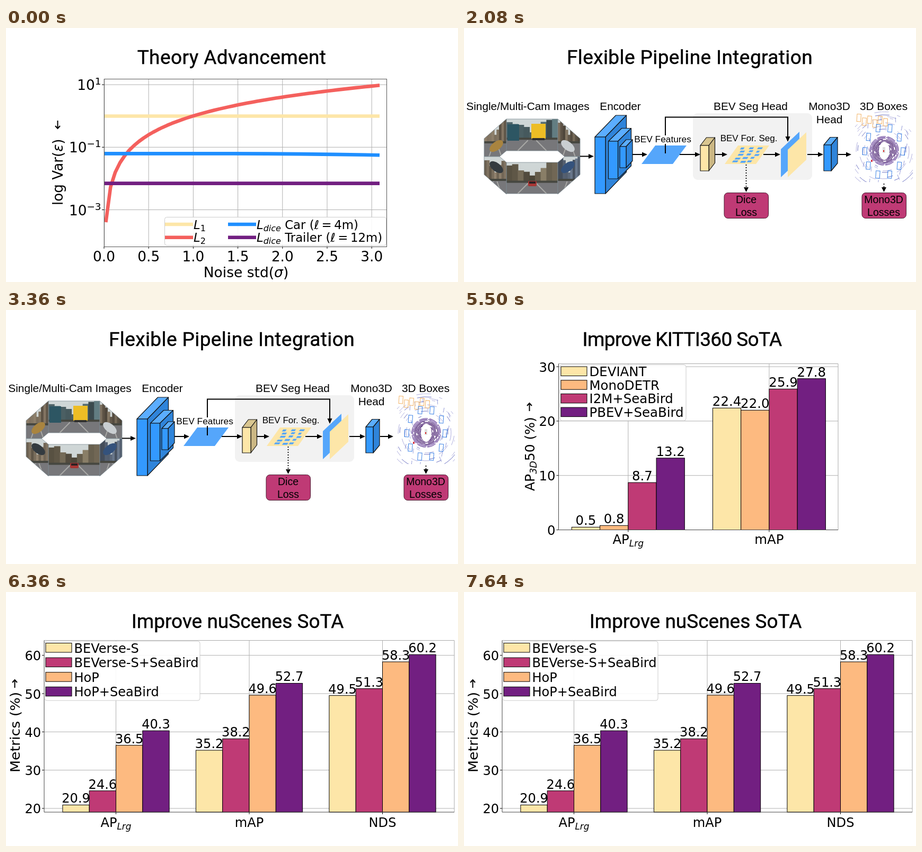
An HTML page that plays this animation: 853x480 px, repeating every 8500 ms.

```html
<!DOCTYPE html>
<html lang="en">
<head>
<meta charset="utf-8">
<title>Results slides</title>
<style>
html, body { margin: 0; width: 100%; height: 100%; overflow: hidden; background: #fff; }
svg { display: block; width: 100%; height: 100%; }
.title { font: 37px Roboto, "Open Sans", sans-serif; text-anchor: middle; stroke: #000; stroke-width: .45px; }
.plot { font-family: "DejaVu Sans", sans-serif; }
.flow { font-family: "Liberation Sans", Arial, sans-serif; text-anchor: middle; }
.mid { text-anchor: middle; }
.end { text-anchor: end; }
.it { font-style: italic; }
</style>
</head>
<body>
<svg id="stage" viewBox="0 0 853 480"></svg>
<script>
const YELLOW = '#fde6a8', ORANGE = '#fdba80', PINK = '#bf3a75', PURPLE = '#721f81';
const RED = '#f4605d', BLUE = '#1f8fff', SKY = '#55a6fb', GRID = '#b0b0b0';

// drawing helpers
const line = (x1, y1, x2, y2, c = '#000', w = 1, o = '') =>
  `<line x1="${x1}" y1="${y1}" x2="${x2}" y2="${y2}" stroke="${c}" stroke-width="${w}" ${o}/>`;
const rect = (x, y, w, h, c, o = '') =>
  `<rect x="${x}" y="${y}" width="${w}" height="${h}" fill="${c}" ${o}/>`;
const poly = (pts, c, o = '') => `<polygon points="${pts}" fill="${c}" ${o}/>`;
const path = (d, c, w, o = '') => `<path d="${d}" fill="none" stroke="${c}" stroke-width="${w}" ${o}/>`;
const text = (x, y, s, size, cls = '', k = 1) =>
  `<text class="${cls}" font-size="${size}" transform="translate(${x} ${y}) scale(${k} 1)">${s}</text>`;
const upText = (x, y, s, size, k = 1) =>
  `<text font-size="${size}" transform="translate(${x} ${y}) rotate(-90) scale(1 ${k})">${s}</text>`;
const shift = (s, size, dy, it = true) =>
  `<tspan font-size="${size}" dy="${dy}"${it ? ' class="it"' : ''}>${s}</tspan>`;
const italic = s => `<tspan class="it">${s}</tspan>`;
const title = (x, s, gap) => `<text class="title" x="${x}" y="68" letter-spacing="${gap}">${s}</text>`;
const pointer = (x, y, d) => path(`M${x} ${y}v${15 * d}m-4.5 ${-5 * d}l4.5 ${5 * d}l4.5 ${-5 * d}`, '#000', 2);
const legendBox = (x, y, w, h) => rect(x, y, w, h, '#fff', 'fill-opacity=".9" stroke="#ccc" rx="4"');
const each = (n, fn) => Array.from({ length: n }, (_, i) => fn(i)).join('');
const random = seed => () => (seed = (seed * 16807) % 2147483647) / 2147483647;

function theory() {
  const X = s => 185 + 168.4 * s, Y = e => 166.2 - 59.1 * e;
  let out = title(426, 'Theory Advancement', .4);
  out += each(7, i => {
    const x = X(i / 2);
    return line(x, 96, x, 413, GRID) + line(x, 413, x, 417) + text(x, 441, (i / 2).toFixed(1), 26.3, 'mid');
  });
  for (const e of [1, -1, -3]) {
    const y = Y(e), power = String(e).replace('-', '−');
    out += line(185, y, 718, y, GRID) + line(181, y, 185, y) +
      text(179.5, y + 10, '10' + shift(power, 18.4, -10, false), 26.3, 'end');
  }
  const curve = each(59, i => {
    const s = .02 + i * .0529;
    return (i ? 'L' : 'M') + X(s).toFixed(1) + ' ' + Y(2 * Math.log10(s)).toFixed(1);
  });
  out += line(185, 166.5, 705, 166.5, YELLOW, 6.6) + path(curve, RED, 6.6, 'stroke-linejoin="round"');
  out += path('M185 237.4H430Q570 237.6 705 240.2', BLUE, 6.6) + line(185, 293.6, 705, 293.6, PURPLE, 6.6);
  out += rect(185.5, 96.5, 533, 317, 'none', 'stroke="#555"') + legendBox(299.5, 357.5, 418, 53.5);

  const name = (sub, it, rest = '') =>
    italic('L') + shift(sub, 16, 4, it) + (rest && shift(' ' + rest, 22.8, -4, false));
  const keys = [
    [YELLOW, name('1', false)], [RED, name('2', false)],
    [BLUE, name('dice', true, 'Car (ℓ\u2009=\u20094m)')], [PURPLE, name('dice', true, 'Trailer (ℓ\u2009=\u200912m)')]
  ];
  keys.forEach(([c, s], i) => {
    const x = i < 2 ? 300 : 419, y = 371 + 24.7 * (i % 2);
    out += line(x, y, x + 53, y, c, 6.6) + text(x + 54, y + 8.5, s, 22.8);
  });
  out += text(453, 471, `Noise std(${italic('σ')})`, 26.5, 'mid') + upText(107, 335, `log Var(${italic('ε')})`, 26.2);
  return out + pointer(97.5, 175, 1);
}

function barChart(c) {
  const { L, R, T, B, k, size } = c;
  const Y = v => c.zero - v * c.unit;
  let out = '', labels = '';
  for (let v = c.first; Y(v) > T; v += 10) {
    out += line(L, Y(v), R, Y(v), GRID) + line(L - 4, Y(v), L, Y(v)) + text(L - 6, Y(v) + 9.5, v, size, 'end', k);
  }
  c.groups.forEach(([name, vals], g) => {
    const x = c.x0 + g * c.gap;
    out += line(x, T, x, B, GRID) + line(x, B, x, B + 4) + text(x, c.nameY, name, size, 'mid', k);
    vals.forEach((v, i) => {
      const left = x + (i - 2) * c.w, top = Y(v);
      out += rect(left, top, c.w, B - top, c.colors[i], 'stroke="#000"');
      labels += text(left + c.w / 2, top - 4, v.toFixed(1), size, 'mid', k);
    });
  });
  out += path(`M${L} ${T}H${R}V${B}`, '#aaa', 1) + path(`M${L} ${T}V${B}H${R}`, '#444', 1) + labels;
  const [x, y, w, h, step] = c.legend;
  out += legendBox(x, y, w, h);
  c.names.forEach((s, i) => {
    const cy = y + 12.5 + i * step;
    out += rect(x + 2, cy - 9, 49, 17.5, c.colors[i], 'stroke="#000"') + text(x + 55.5, cy + 9, s, size, '', k);
  });
  return out;
}

const apLrg = size => 'AP' + shift('Lrg', size * .7, 5);

function kitti() {
  return title(411.5, 'Improve KITTI360 SoTA', -.65) + barChart({
    L: 178.5, R: 706, T: 101.5, B: 415.5, k: 1, size: 24.4,
    zero: 415.5, unit: 10.28, first: 0, x0: 309.8, gap: 266.1, w: 53.25, nameY: 441.5,
    colors: [YELLOW, ORANGE, PINK, PURPLE],
    names: ['DEVIANT', 'MonoDETR', 'I2M+SeaBird', 'PBEV+SeaBird'],
    legend: [181, 103.5, 238, 105.5, 25.7],
    groups: [[apLrg(24.4), [.5, .8, 8.7, 13.2]], ['mAP', [22.4, 22, 25.9, 27.8]]]
  }) + upText(132.5, 342, 'AP' + shift('3D', 17.5, 4.5) + shift('50 (%)', 25, -4.5, false), 25) + pointer(123.5, 191, -1);
}

function nuscenes() {
  return title(437, 'Improve nuScenes SoTA', 0) + barChart({
    L: 72, R: 846, T: 91.5, B: 416, k: .94, size: 25.6,
    zero: 553.6, unit: 7.232, first: 20, x0: 207.5, gap: 251.5, w: 50.3, nameY: 443.5,
    colors: [YELLOW, PINK, ORANGE, PURPLE],
    names: ['BEVerse-S', 'BEVerse-S+SeaBird', 'HoP', 'HoP+SeaBird'],
    legend: [73, 93, 293, 112, 27.6],
    groups: [
      [apLrg(25.6), [20.9, 24.6, 36.5, 40.3]],
      ['mAP', [35.2, 38.2, 49.6, 52.7]],
      ['NDS', [49.5, 51.3, 58.3, 60.2]]
    ]
  }) + upText(25.5, 341, 'Metrics (%)', 26.8, .9) + pointer(16.5, 181, -1);
}

// box with front face (x, y, w, h) and depth (dx, dy)
function cube(x, y, w, h, dx, dy, [front, top, side]) {
  const o = 'stroke="#111" stroke-width="1.2" stroke-linejoin="round"', r = x + w;
  return poly([x, y, x + dx, y - dy, r + dx, y - dy, r, y], top, o) +
    poly([r, y, r + dx, y - dy, r + dx, y - dy + h, r, y + h], side, o) + rect(x, y, w, h, front, o);
}

const slab = (x, y, w, h, lean, c) => poly([x, y + h, x + lean, y, x + lean + w, y, x + w, y + h], c);
const panel = (x, y, w, h, rise, c) => poly([x, y, x + w, y - rise, x + w, y - rise + h, x, y + h], c);
const arrow = (x1, x2, y) => line(x1, y, x2 - 8, y, '#000', 2) + poly([x2 - 10, y - 4.5, x2, y, x2 - 10, y + 4.5], '#000');
const drop = (x, y1, y2) => line(x, y1, x, y2 - 8, '#000', 1.8, 'stroke-dasharray="2 3"') +
  poly([x - 4.5, y2 - 9, x + 4.5, y2 - 9, x, y2], '#000');

// street view clipped to a polygon: sky, seeded buildings, road with lanes
function street(pts, id, x, y, w, h, hue) {
  const rnd = random(id * 97 + 5), horizon = y + h * .62, n = 9, bw = w / n;
  let body = rect(x, y, w, h, '#cfd6d6');
  body += each(n, i => {
    const tall = h * (.2 + .16 * Math.abs(i - 4) * (.5 + rnd() * .7)), shade = 26 + rnd() * 24;
    return rect(x + i * bw, horizon - tall, bw + 1, tall + 2, `hsl(${hue} 14% ${shade}%)`);
  });
  body += rect(x, horizon, w, h, '#77777a') + rect(x, horizon - 2, w, 4, '#464740');
  body += each(2, i => path(`M${x + w * (.42 + .16 * i)} ${horizon + 3}L${x + w * (.22 + .56 * i)} ${y + h}`, '#a9a9a6', 2));
  return `<clipPath id="cam${id}">${poly(pts, '#000')}</clipPath><g clip-path="url(#cam${id})">${body}</g>` +
    poly(pts, 'none', 'stroke="#7c8b93" stroke-width=".8"');
}

function cameras() {
  let out = street([80, 172, 177, 172, 177, 232, 80, 232], 1, 80, 172, 97, 60, 190) +
    street([80, 254, 177, 254, 177, 313, 80, 313], 2, 80, 254, 97, 59, 40);
  for (let i = 0; i < 4; i++) {
    const fx = x => i % 2 ? 257 - x : x, fy = y => i > 1 ? 486 - y : y;
    const pts = [[80, 172], [38, 209], [38, 243], [67, 243], [80, 232]].map(([x, y]) => [fx(x), fy(y)]);
    const x = i % 2 ? 177 : 38, y = i > 1 ? 243 : 172;
    out += street(pts, 3 + i, x, y, 42, 71, i === 3 ? 215 : 35);
    const body = ['#a9843f', '#c9ced1', '#343b40', '#34527c'][i];
    out += `<ellipse cx="${fx(61)}" cy="${fy(223)}" rx="15" ry="8" fill="${body}" transform="rotate(${(i % 3 ? 38 : -38)} ${fx(61)} ${fy(223)})"/>`;
  }
  out += rect(82, 182, 22, 31, '#2d5663') + rect(127, 181, 27, 28, '#edbd25') + rect(129, 208, 23, 4, '#30302e');
  return out + rect(121, 289, 16, 10, '#a73634', 'rx="2"') + rect(123, 290, 12, 4, '#2b2224');
}

function pointCloud() {
  const rnd = random(11), cx = 793, cy = 232;
  const arc = (r, c, w, dash) => `<ellipse cx="${cx}" cy="${cy}" rx="${r}" ry="${r}" fill="none" stroke="${c}" ` +
    `stroke-width="${w}" stroke-dasharray="${dash}" transform="rotate(${Math.floor(rnd() * 360)} ${cx} ${cy})"/>`;
  let out = '<clipPath id="scan"><rect x="738" y="158" width="109" height="133"/></clipPath><g clip-path="url(#scan)">';
  out += each(16, i => arc(32 + i * 3, i % 3 ? '#a3a2d8' : '#5c62bb', .8, `${6 + rnd() * 22} ${40 + rnd() * 60}`));
  out += each(10, i => arc(11 + i * 1.8, i < 7 ? '#43186c' : '#6c479c', 1.1, `${14 + rnd() * 30} ${1 + rnd() * 5}`));
  // short rows of returns from walls
  out += each(22, i => {
    const a = i * 2.4, r = 42 + rnd() * 28;
    const x = cx + r * .72 * Math.cos(a), y = cy + r * Math.sin(a);
    return path(`M${x.toFixed(1)} ${y.toFixed(1)}l${(rnd() * 8 - 4).toFixed(1)} 9`, '#5660c0', 1.1, 'stroke-dasharray="1.2 1"');
  });
  out += `<ellipse cx="${cx}" cy="${cy}" rx="10" ry="17" fill="#fff"/>`;
  const box = (x, y, c) => rect(x.toFixed(1), y.toFixed(1), 7.5, 14, 'none', `stroke="${c}" transform="rotate(4 ${x} ${y})"`);
  out += each(6, i => box(742 + i * 10, 162 + rnd() * 14, '#f2b366'));
  out += each(10, i => box(cx - 4 + 36 * Math.cos(i * .63), cy - 6 + 46 * Math.sin(i * .63), '#3d83e6'));
  return out + '</g>' + rect(790, 225, 5, 11, '#ddd') + rect(791, 231, 2, 3, '#d22') + rect(768, 249, 3, 4, '#d63b4b');
}

function pipeline() {
  const blues = ['#3399ff', '#5badff', '#2f84da'], sands = [YELLOW, '#d9c690', '#cbb784'];
  let out = title(426, 'Flexible Pipeline Integration', .4);
  out += rect(432, 161, 225, 126, '#f2f2f2', 'rx="9"') + cameras();
  out += cube(247, 206, 20, 107, 39.5, 41, blues) + cube(272.5, 214, 18, 71, 25, 24.5, blues) +
    cube(294, 224, 12, 40, 12, 13, blues);
  out += cube(446, 222, 16, 48, 11.5, 15, sands) + cube(679, 221, 14, 49, 12, 14.5, blues);
  out += slab(335, 222, 59, 35, 26, SKY) + slab(492, 222, 59, 35, 25, YELLOW);
  out += path('M380 237V219M380 203V168.5H611V207', '#000', 2) + poly([606.5, 205, 615.5, 205, 611, 215], '#000');

  // vehicles seen from above, in three lanes
  const rnd = random(7);
  out += '<g transform="matrix(1 0 -.72 1 517 222)">' + each(15, i =>
    rect(9 + 15 * (i % 3) + rnd() * 6, 2 + 6.4 * Math.floor(i / 3) + rnd() * 2, 5 + rnd() * 5, 3.6, SKY)) + '</g>';

  out += panel(598, 229, 35, 53, 33, SKY) + panel(611, 230, 35, 52, 33, YELLOW);
  out += arrow(219, 245, 242.5);
  for (const [a, b] of [[318, 346], [407, 446], [473, 497], [565, 597], [648, 678], [706, 731]]) out += arrow(a, b, 239);
  out += pointCloud() + drop(532.5, 258, 310) + drop(792.5, 294, 310);
  for (const x of [491, 751]) out += rect(x, 311.5, 83.5, 48, PINK, 'rx="7" stroke="#4a1a30"');

  const heads = [[120.5, 'Single/Multi-Cam Images'], [295, 'Encoder'], [541, 'BEV Seg Head'], [689.5, 'Mono3D'], [792, '3D Boxes']];
  const losses = [[532.5, 'Dice', 'Loss'], [792, 'Mono3D', 'Losses']];
  out += '<g class="flow">' + heads.map(([x, s]) => text(x, 154.5, s, 20.8)).join('') + text(689.5, 180, 'Head', 20.8);
  out += text(375, 216, 'BEV Features', 17.3) + text(537.5, 214, 'BEV For. Seg.', 17);
  return out + losses.map(([x, a, b]) => text(x, 331, a, 19.5) + text(x, 355, b, 19.5)).join('') + '</g>';
}

const LOOP = 8500, cuts = [0, 2080, 4220, 6360, LOOP];
const stage = document.getElementById('stage');
stage.innerHTML = [theory, pipeline, kitti, nuscenes]
  .map((draw, i) => `<g class="plot" opacity="${i ? 0 : 1}">${draw()}</g>`).join('');

[...stage.children].forEach((slide, i) => {
  const step = (opacity, at) => ({ opacity, offset: at / LOOP, easing: 'steps(1, end)' });
  slide.animate(
    [step(i ? 0 : 1, 0), step(1, cuts[i]), step(0, cuts[i + 1]), step(0, LOOP)],
    { duration: LOOP, iterations: Infinity }
  );
});
</script>
</body>
</html>
```
